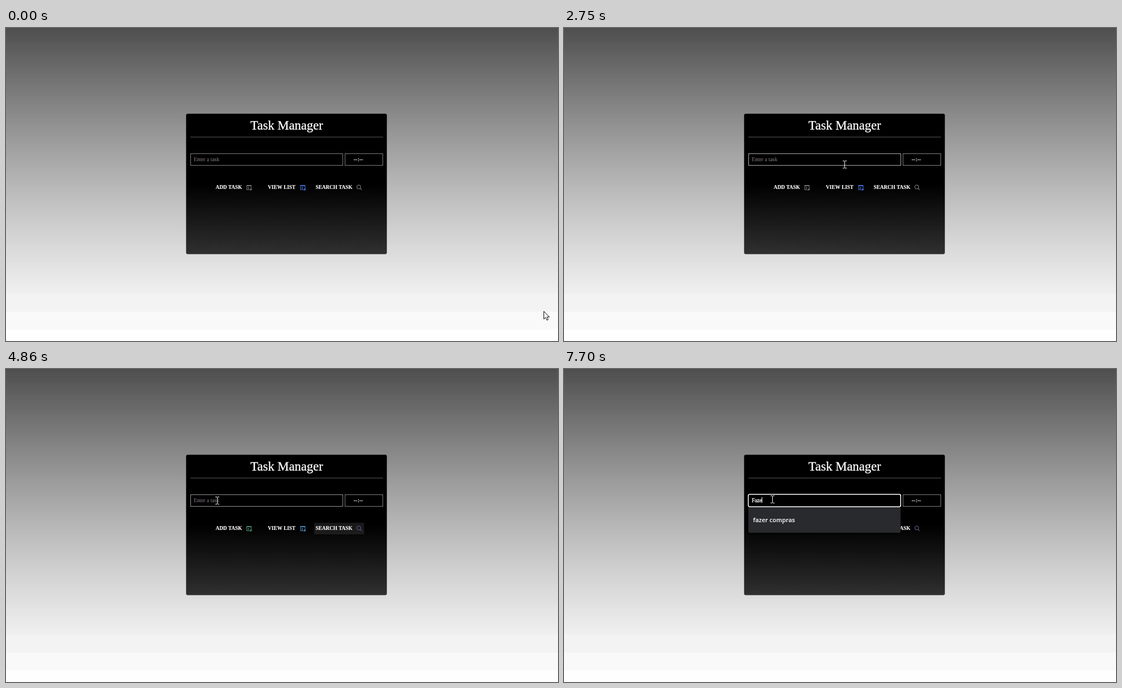
These frames come from a looping animation (994 by 564 pixels, 8 s). An HTML page with a canvas:

```html
<!DOCTYPE html>
<html lang="en">
<head>
<meta charset="utf-8">
<title>Task Manager</title>
<style>
html, body { margin: 0; width: 100%; height: 100%; overflow: hidden; background: #fff; }
canvas { display: block; }
</style>
</head>
<body>
<canvas id="stage" width="994" height="564"></canvas>
<script>
const g = document.getElementById('stage').getContext('2d');
const LOOP = 8000, STEP = 78.4, FOCUS = 5300;
const SERIF = '"Liberation Serif", "Times New Roman", serif';
const SANS = '"Open Sans", "Noto Sans", sans-serif';
const FIELD = '9.75px ' + SERIF, LABEL = 'bold 9.4px ' + SERIF;
const KEYS = [6130, 6600, 7550, 7700];

// Pointer path: time, x, y
const PATH = [
  [0, 968, 510], [390, 940, 321], [560, 940, 321], [1400, 603, 175],
  [1874, 580, 183], [2280, 622, 246], [2950, 450, 244], [3290, 430, 277],
  [3599, 427, 288], [4450, 600, 287], [4853, 380, 236], [5600, 375, 234]
];
const ROWS_ALL = ['1', 'fsdf', 'dasd', '4', 'dsad', 'df'];
const ROWS_F = ['fsdf', 'f', 'fds', 'fd', 'fsd', 'fazer compras'];

const clamp = v => Math.max(0, Math.min(1, v));
const ramp = (t, start, len = 400) => clamp((t - start) / len);
const fade = (t, on, off) => ramp(t, on) * (1 - ramp(t, off));
const mix = (a, b, k) => 'rgb(' + a.map((v, i) => Math.round(v + (b[i] - v) * k)).join() + ')';
const gray = (a, b, k) => mix([a, a, a], [b, b, b], k);

// A hairline stroke gives the glyphs their heavier weight
function text(s, x, y, font, color = '#fff', weight = .3) {
  g.font = font;
  g.fillStyle = g.strokeStyle = color;
  g.lineWidth = weight;
  g.fillText(s, x, y);
  g.strokeText(s, x, y);
}
function rect(x, y, w, h, color) {
  g.fillStyle = color;
  g.fillRect(x, y, w, h);
}
function box(x, y, w, h, color) {
  g.strokeStyle = color;
  g.lineWidth = 1;
  g.strokeRect(x + .5, y + .5, w - 1, h - 1);
}
function round(x, y, w, h, r) {
  g.beginPath();
  g.roundRect(x, y, w, h, r);
}

// The page brightens downwards and ends in three wide bands
function page() {
  for (let y = -1, h; y < 564; y += h) {
    h = y < 479 ? 4 : 32;
    const rest = Math.max(0, 1 - (y + h / 2) / 564);
    rect(0, y, 994, h, gray(254, 78, rest ** 1.3));
  }
}
function card() {
  const fill = g.createLinearGradient(0, 154, 0, 408);
  fill.addColorStop(.5, '#000');
  fill.addColorStop(1, '#303030');
  g.fillStyle = fill;
  round(324.3, 154.4, 361.5, 253.2, 3);
  g.fill();
}

function pointerAt(t) {
  const i = PATH.findIndex(p => p[0] > t);
  if (i < 0) return PATH.at(-1).slice(1);
  const [t0, x0, y0] = PATH[i - 1], [t1, x1, y1] = PATH[i];
  const k = (t - t0) / (t1 - t0);
  return [Math.round(x0 + (x1 - x0) * k), Math.round(y0 + (y1 - y0) * k)];
}

function listIcon(x, y, color) {
  box(x, y, 9, 9, color);
  rect(x, y + 1, 9, 1, color);
  for (const dy of [4, 6]) rect(x + 2, y + dy, 3, 1, color);
  rect(x + 6, y + 8, 4, 1, color);
  rect(x + 7, y + 6, 1, 4, color);
}
function lensIcon(color) {
  g.strokeStyle = color;
  g.lineWidth = 1.1;
  g.beginPath();
  g.arc(635.2, 286.4, 3.4, 0, 7);
  g.moveTo(637.6, 288.8);
  g.lineTo(640.6, 291.8);
  g.stroke();
}

function button(x, label, textX, k) {
  rect(x, 277, 90, 21, `rgba(68,68,68,${k})`);
  text(label, textX, 290, LABEL, '#fff', .15);
}

function dropdown(rows, height) {
  g.save();
  g.shadowColor = 'rgba(0,0,0,.35)';
  g.shadowBlur = 3;
  g.shadowOffsetY = 1;
  g.fillStyle = '#292a2d';
  round(332, 249, 274, height, [0, 0, 2, 2]);
  g.fill();
  g.shadowColor = 'transparent';
  g.clip();
  rows.forEach((row, i) => text(row, 340.5, 276.3 + i * 32.5, '600 11px ' + SANS, '#f1f2f4', .15));
  g.restore();
}

function shape(x, y, d) {
  g.save();
  g.translate(x, y);
  const p = new Path2D(d);
  g.lineJoin = 'round';
  g.lineWidth = 1;
  g.fillStyle = '#fff';
  g.strokeStyle = '#000';
  g.fill(p);
  g.stroke(p);
  g.restore();
}
function pointer(x, y) {
  const inField = y > 226 && y < 248 && x > 331 && x < 606;
  const onButton = y > 276 && y < 299 && x > 364 && x < 646;
  if (inField) {
    rect(x, y - 5, 1, 12, '#fff');
    for (const dy of [-6, 7]) for (const dx of [-3, 1]) rect(x + dx, y + dy, 3, 1, '#fff');
  } else if (onButton) {
    shape(x, y, 'M-2 1Q0-1 1 1V7Q3 5 4 7Q6 6 7 8Q9 7 9 9V14L7 19H-2L-6 12Q-6 9-4 10L-2 12Z');
  } else {
    shape(x, y, 'M.5 .5V14.5L3.8 11.5L6 16.5L8.3 15.5L6.2 10.8H10.5Z');
  }
}

function focusRing(t) {
  const w = 3 - 1.5 * ramp(t, FOCUS + 30, 330);
  g.lineWidth = w;
  g.strokeStyle = '#fff';
  g.fillStyle = '#000';
  round(331 + w / 2, 225 + w / 2, 276 - w, 24 - w, 3);
  g.fill();
  g.stroke();
}

function draw(now) {
  const t = now % LOOP;
  // The screen refreshes in even steps
  const q = Math.max(0, 620 + Math.floor((t - 620) / STEP) * STEP);

  page();
  card();
  g.textAlign = 'center';
  text('Task Manager', 505.5, 183, '23.1px ' + SERIF, gray(255, 128, fade(q, 1170, 2040)));
  g.textAlign = 'left';
  rect(332, 196, 347, 1, '#555');

  const hover = Math.max(fade(q, 2360, 3020), ramp(q, 4720, 300));
  box(332, 226, 275, 22, gray(125, 175, hover));
  box(610, 226, 69, 22, gray(125, 165, fade(q, 2180, 2400)));
  text('--', 626, 240, FIELD);
  text(':', 633.3, 240, FIELD);
  text('--', 636.3, 240, FIELD);

  button(365, 'ADD TASK', 377.5, fade(q, 3270, 3850));
  button(460, 'VIEW LIST', 471.5, fade(q, 3800, 4220));
  button(555, 'SEARCH TASK', 557.5, fade(q, 4220, 4600));
  listIcon(433, 283, mix([112, 116, 114], [75, 140, 105], ramp(q, 3270)));
  listIcon(530, 283, mix([65, 110, 215], [75, 135, 185], ramp(q, 3800)));
  lensIcon(mix([125, 125, 125], [104, 84, 134], ramp(q, 4220)));

  const pressed = KEYS.filter(k => t >= k);
  const typed = 'Faze'.slice(0, pressed.length);
  const focused = q >= FOCUS;
  if (focused) {
    if (t < 6210) dropdown(ROWS_ALL, 209);
    else if (t < 6690) dropdown(ROWS_F, t < 6600 ? 209 : 55.5);
    else dropdown(ROWS_F.slice(-1), 46);
    focusRing(q);
  }
  if (typed) text(typed, 338, 240, FIELD);
  else text('Enter a task', 338, 240, FIELD, '#7c727c', .1);

  const sinceInput = t - (pressed.at(-1) ?? FOCUS);
  if (focused && sinceInput < 615) {
    g.font = FIELD;
    rect(Math.round(338 + g.measureText(typed).width), 231, 1, 10, '#fff');
  }
  pointer(...pointerAt(q));
}

const start = performance.now();
function tick() {
  draw(performance.now() - start);
  requestAnimationFrame(tick);
}
tick();
</script>
</body>
</html>
```
